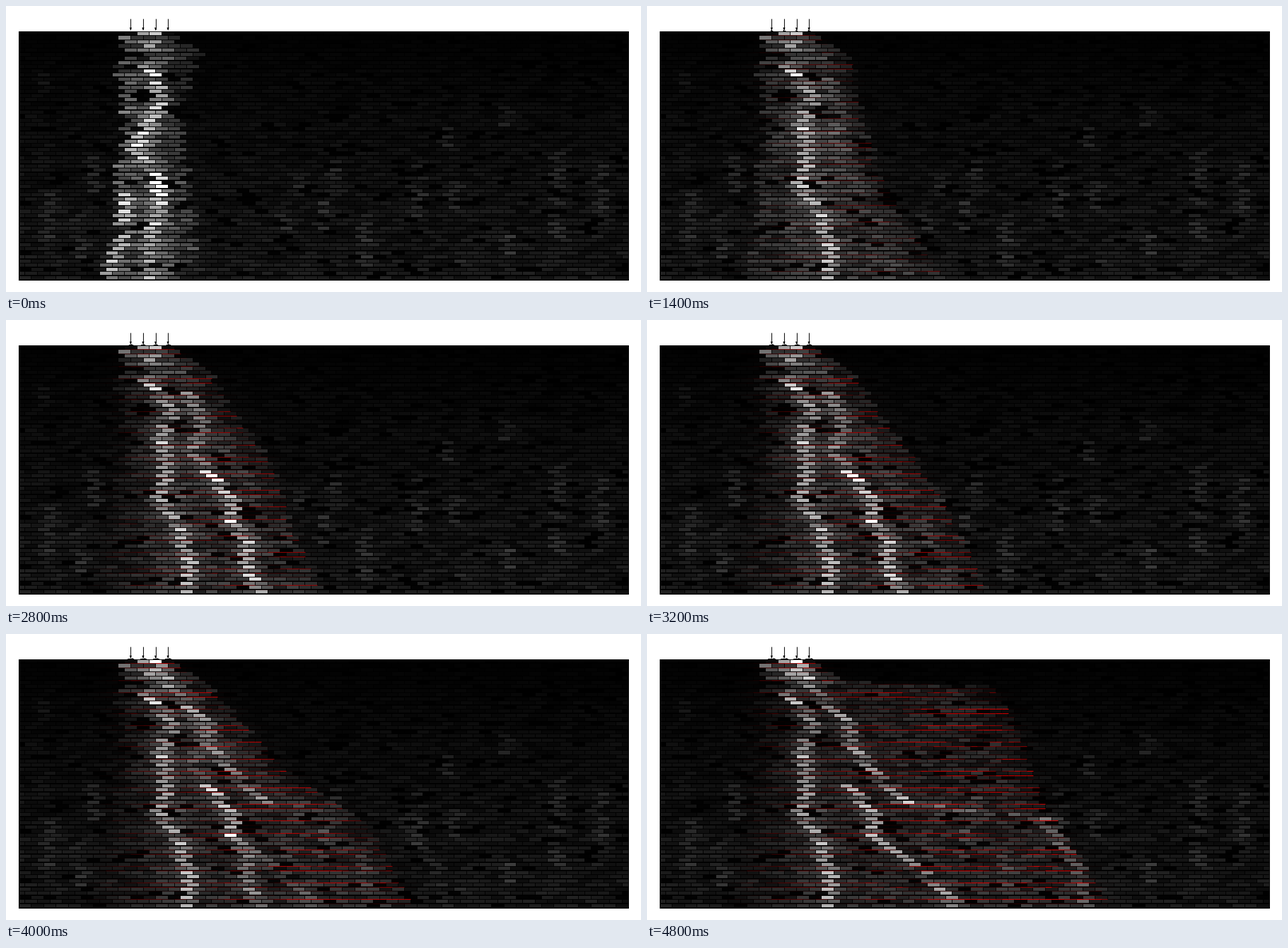
A matplotlib script for the animation above (5 s loop, 1000 by 451 pixels).

```python
import numpy as np
import matplotlib.pyplot as plt
from matplotlib.animation import FuncAnimation
from matplotlib.collections import LineCollection, PolyCollection
from matplotlib.patches import Rectangle

W, H, DPI = 1000, 451, 128
PT = 72 / DPI
FRAMES, STEP = 25, 200
ROWS, PITCH, TOP = 60, 6.525, 40.5
LEFT, RIGHT = 20, 980
BRICK = (RIGHT - LEFT) / 49
rng = np.random.default_rng(12)

# Right edge of the loaded zone: depth stations, then x per key time
EDGE_T = [0, 1.4, 2.8, 3.8, 4.4, 4.8]
EDGE_Y = [43, 75, 82, 150, 215, 280, 310, 430]
EDGE_X = np.array([
    [262, 300, 296, 275, 272, 282, 288, 300],
    [262, 308, 315, 326, 345, 366, 385, 460],
    [262, 308, 315, 355, 405, 432, 435, 490],
    [262, 308, 315, 370, 425, 490, 530, 585],
    [262, 308, 315, 390, 450, 610, 645, 720],
    [262, 310, 535, 580, 595, 625, 645, 720],
])
LEFT_X = [188, 174, 182, 188, 173, 178, 165, 150]

# Force chains: top, bottom, evenly spaced x, (time on, time off, strength)
CHAINS = [
    (43, 117, [227, 231, 217, 245], (-1, 9, .58)),
    (117, 297, [237, 245, 222, 205, 232, 245], (-1, .7, .48)),
    (300, 430, [190, 184, 158], (-1, .9, .48)),
    (262, 430, [240, 242, 224, 228], (-1, 1, .48)),
    (114, 318, [245, 263, 244, 250, 252, 240, 270], (.6, 9, .52)),
    (318, 430, [270, 276, 287, 288, 284], (.9, 9, .58)),
    (112, 255, [285, 312, 292, 335], (1.5, 4, .34)),
    (238, 318, [318, 340, 360, 351], (2.3, 9, .64)),
    (318, 430, [351, 382, 377, 385, 403], (2.2, 4.1, .6)),
    (325, 430, [362, 440, 488], (4.1, 9, .48)),
    (46, 266, [240, 261, 313, 324, 362, 410], (3.8, 9, .5)),
    (266, 290, [410, 500, 620], (4.2, 9, .25)),
    (290, 430, [620, 676, 690], (4.2, 9, .26)),
]

# Columns resting under self weight: x, top, bottom
COLUMNS = [
    (60, 105, 135), (65, 285, 375), (120, 325, 400), (140, 235, 295),
    (440, 325, 362), (460, 265, 300), (515, 240, 300), (500, 310, 350),
    (565, 330, 412), (650, 245, 335), (695, 190, 230), (705, 275, 330),
    (785, 155, 190), (795, 360, 392), (870, 220, 375), (935, 240, 372),
    (710, 398, 424), (280, 270, 340), (293, 375, 400),
]
# Unloaded bricks: x, y
VOIDS = [(212, 79), (212, 142), (208, 346), (262, 281), (375, 305),
         (262, 112), (470, 190), (622, 262), (915, 350)]


def build_bricks():
    out = []
    for r in range(ROWS):
        start = LEFT - BRICK / 2 if r % 2 == 0 else LEFT
        for c in range(50 - r % 2):
            a = max(start + c * BRICK, LEFT)
            b = min(start + (c + 1) * BRICK, RIGHT)
            out.append((r, a, b, start + (c + .5) * BRICK))
    return np.array(out).T


def left_edge(y):
    return np.interp(y, np.linspace(43, 430, len(LEFT_X)), LEFT_X)


def right_edge(y, t):
    xs = [np.interp(t, EDGE_T, col) for col in EDGE_X.T]
    return np.interp(y, EDGE_Y, xs)


def ridge(top, bottom, xs):
    """Closeness of every brick to a path running down the wall."""
    py = np.linspace(top, bottom, len(xs))
    slope = abs(xs[-1] - xs[0]) / (bottom - top)
    width = max(9.5, slope * PITCH * .45)
    inside = (cy >= top - 3) & (cy <= bottom + 3)
    return np.exp(-((cx - np.interp(cy, py, xs)) / width) ** 2) * inside


def strength(t, on, off, peak):
    rise = np.clip((t - on) / .8 + .5, 0, 1)
    fall = np.clip((off - t) / 1.2 + .5, 0, 1)
    return peak * rise * fall


row, x0, x1, cx = build_bricks()
y0 = TOP + row * PITCH
cy = y0 + 2.8
n = len(row)
depth = (cy - TOP) / (ROWS * PITCH)
grain = rng.uniform(.45, 1.35, n)

rest = (.004 + .10 * depth ** .8) * grain
for x, top, bottom in COLUMNS:
    path = x + rng.choice([-5, 0, 5], ROWS)[row.astype(int)]
    near = np.exp(-((cx - path) / 8) ** 2)
    rest += (.04 + .1 * depth) * near * ((cy > top) & (cy < bottom))

solid = np.where(rng.random(n) < .07, .08, 1.0)
for x, y in VOIDS:
    solid[(abs(cx - x) < 10) & (abs(cy - y) < 8)] = .05
rest *= solid

ridges = [ridge(*c[:3]) * rng.uniform(.85, 1.15, n) for c in CHAINS]
brick_left = left_edge(cy)

# Joints between courses, cut at every half brick
half = BRICK / 2
ji, jc = [a.ravel() for a in np.meshgrid(np.arange(ROWS - 1), np.arange(98), indexing="ij")]
jx = LEFT + jc * half
jy = TOP + (ji + 1) * PITCH - .55
jmid = jx + half / 2
joint_left = left_edge(jy) - 4
phase = ((ji - 4) / 3.786 + .5) % 1 - .5
sharp = np.where(abs(phase) < .24, 1, .2)
slip = rng.random((ROWS - 1, 102))
slip = sum(slip[:, k:k + 98] for k in range(5)).ravel() / 5
slip = np.clip((slip - .3) / .32, .12, 1)


def brick_tones(t):
    edge = right_edge(cy, t)
    inside = (cx > brick_left) & (cx < edge + 6)
    taper = np.clip((edge - cx) / 40, .45, 1)
    drift = .8 * min(t / 2.4, 1)
    fade = 1 - drift * np.clip((245 - cx) / 60, 0, 1) * np.clip(depth * 5, 0, 1)
    fill = np.clip(29 / (edge - brick_left) + .03, 0, .4) * inside * taper * fade
    fill = np.where(row == 0, .5 * inside, fill * grain)
    load = fill * solid
    for mask, chain in zip(ridges, CHAINS):
        load = load + mask * strength(t, *chain[3]) * np.sqrt(solid)
    v = np.clip(rest + load, 0, 1)
    return np.column_stack([v, v, v])


def joint_tones(t):
    edge = right_edge(jy, t)
    u = (jmid - joint_left) / (edge - joint_left)
    inside = (u > 0) & (u < 1.02)
    ramp = np.clip(.25 + 1.1 * u, 0, 1)
    halo = .12 * np.exp(-np.maximum(joint_left - jmid, jmid - edge).clip(0) / 18)
    power = (t / 4.8) ** .7
    red = np.zeros((len(u), 4))
    red[:, 0] = .84
    red[:, 3] = np.clip(power * sharp * np.where(inside, ramp * slip, halo), 0, 1)
    return red


fig = plt.figure(figsize=(W / DPI, H / DPI), dpi=DPI, facecolor="white")
ax = fig.add_axes([0, 0, 1, 1])
ax.set(xlim=(0, W), ylim=(H, 0))
ax.axis("off")
ax.add_patch(Rectangle((LEFT, 40), RIGHT - LEFT + 1, 393, fc="black", lw=0))

left, right, top, bottom = x0 + .7, x1 - .3, y0 + .4, y0 + 5.5
boxes = np.stack([np.column_stack(p) for p in
                  [(left, top), (right, top), (right, bottom), (left, bottom)]], axis=1)
bricks = ax.add_collection(PolyCollection(boxes, linewidths=0))
segs = np.stack([np.column_stack([jx, jy]), np.column_stack([jx + half, jy])], axis=1)
joints = ax.add_collection(
    LineCollection(segs, linewidths=1.2 * PT, capstyle="butt"))

ARROWS = LEFT + BRICK * np.arange(9, 13)
for x in ARROWS:
    ax.plot([x, x], [20, 37], color="black", lw=1.1 * PT, solid_capstyle="butt")
    ax.fill([x - 1.7, x + 1.7, x], [34, 34, 39], color="black", lw=0)
shear = ax.add_collection(LineCollection([], colors="black", linewidths=1.2 * PT))
heads = ax.add_collection(PolyCollection([], facecolors="black", linewidths=0))


def draw(k):
    t = k * STEP / 1000
    bricks.set_facecolor(brick_tones(t))
    joints.set_color(joint_tones(t))
    s = 6 * t / 4.8
    size = min(s, 1.6)
    shear.set_segments([[(x - s, 39.4), (x + s, 39.4)] for x in ARROWS])
    heads.set_verts([[(x + s - 2 * size, 39.4 - size), (x + s, 39.4),
                      (x + s - 2 * size, 39.4 + size)] for x in ARROWS])
    return bricks, joints, shear, heads


anim = FuncAnimation(fig, draw, frames=FRAMES, interval=STEP, repeat=True, repeat_delay=0)
plt.show()
```
